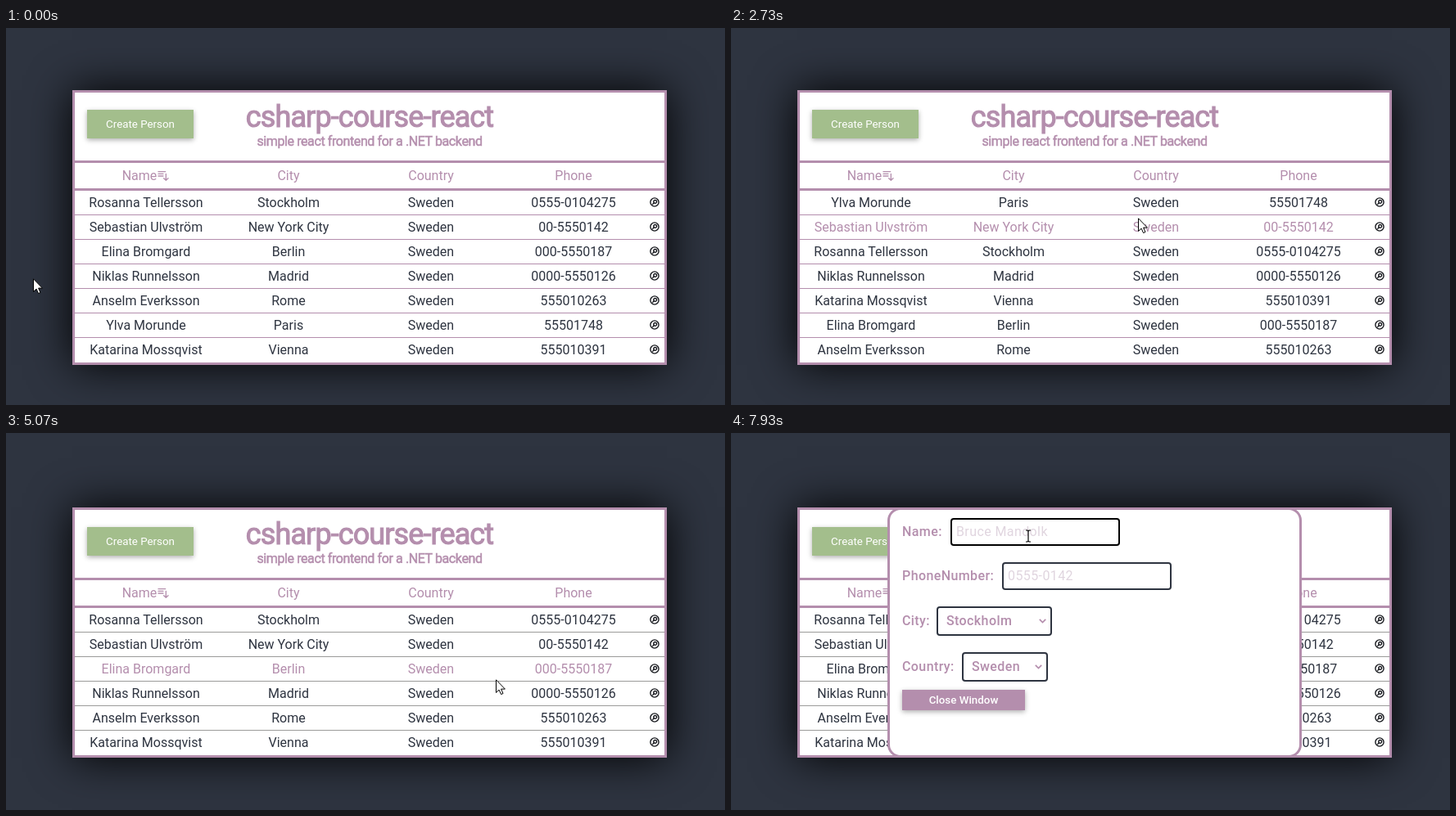
An HTML page that plays this animation: 878x461 px, repeating every 8 s.

```html
<!DOCTYPE html>
<html lang="en">
<head>
<meta charset="utf-8">
<title>csharp-course-react</title>
<style>
  html, body { margin: 0; width: 100%; height: 100%; overflow: hidden; background: #2e3440; }
  #stage { position: relative; width: 878px; height: 461px; overflow: hidden; font: 16px Roboto, sans-serif; color: #2e3440; }
  #stage div, #stage svg { position: absolute; box-sizing: border-box; white-space: pre; }
  .table { background: #fff; border: 3px solid #b48ead; box-shadow: 0 0 50px #000; }
  .modal { background: #fff; border: 3px solid #b48ead; border-radius: 16px; }
  .center { text-align: center; }
  .purple { color: #b48ead; }
  .rule { background: #b48ead; }
  .title, .subtitle { letter-spacing: -.025em; color: #b48ead; text-align: center; -webkit-text-stroke: .5px #b48ead; }
  .title { font-size: 36px; -webkit-text-stroke-width: 1.1px; }
  .heading { font-size: 32px; color: #b48ead; text-align: center; }
  .button { color: #fff; font-size: 13.333px; text-align: center; box-shadow: 0 2px 6px rgba(0, 0, 0, .32); }
  .medium { font-weight: 500; }
  .line { color: #000; }
  .label { color: #b48ead; font-weight: 500; letter-spacing: .025em; }
  .field { border: 2px solid #2e3440; border-radius: 4px; padding-left: 5px; letter-spacing: .025em; color: #e0d5df; background: #fff; }
  .select { padding-left: 10px; color: #b48ead; font-weight: 500; }
  .focus { border-color: #000; }
</style>
</head>
<body>
<div id="stage"></div>
<script>
const LOOP = 8000, FPS = 15;
const PURPLE = '#b48ead', GREEN = '#a3be8c', RED = '#bf616a', GRAY = '#c0c5ce';
const stage = document.getElementById('stage');

const people = [
  ['Rosanna Tellersson', 'Stockholm', '0555-0104275'],
  ['Sebastian Ulvström', 'New York City', '00-5550142'],
  ['Elina Bromgard', 'Berlin', '000-5550187'],
  ['Niklas Runnelsson', 'Madrid', '0000-5550126'],
  ['Anselm Everksson', 'Rome', '555010263'],
  ['Ylva Morunde', 'Paris', '55501748'],
  ['Katarina Mossqvist', 'Vienna', '555010391'],
].map(([name, city, phone], i) => ({ id: i + 1, name, city, country: 'Sweden', phone }));
const ascending = [...people].sort((a, b) => a.name < b.name ? -1 : 1);
const descending = [...ascending].reverse();
const selected = people[5];
const remaining = people.filter(p => p !== selected);

const when = {
  sortUp: 1860, sortDown: 2330, openCard: 3395, removed: 5060, openForm: 6525, focus: 6930,
};

// Pointer path: time, x, y
const path = [
  [600, 33, 306], [800, 72, 290], [933, 125, 266], [1067, 190, 233], [1200, 244, 201],
  [1333, 213, 188], [1467, 187, 183], [1533, 187, 182], [2533, 187, 182],
  [2600, 250, 196], [2733, 497, 232], [2867, 690, 240], [3000, 795, 232], [3067, 815, 224],
  [3200, 800, 215], [3333, 791, 212], [3467, 791, 212],
  [3600, 760, 232], [3667, 705, 250], [3800, 580, 292], [3933, 480, 313], [4133, 435, 309],
  [4467, 435, 309], [4600, 530, 304], [4733, 598, 301], [5267, 598, 301], [5333, 596, 301],
  [5467, 596, 301], [5600, 550, 288], [5800, 420, 245], [6000, 285, 190], [6133, 215, 157],
  [6333, 175, 145], [6533, 175, 145], [6667, 235, 139], [6800, 325, 129], [6933, 363, 126],
];

function pointerAt(t) {
  const next = path.findIndex(k => k[0] > t);
  if (next < 0) return path[path.length - 1].slice(1);
  if (next === 0) return path[0].slice(1);
  const [t0, x0, y0] = path[next - 1], [t1, x1, y1] = path[next];
  const u = (t - t0) / (t1 - t0);
  return [Math.round(x0 + (x1 - x0) * u), Math.round(y0 + (y1 - y0) * u)];
}

const inside = ([px, py], x, y, w, h) => px >= x && px < x + w && py >= y && py < y + h;

function box(cls, x, y, w, h, text = '', style = '') {
  return `<div class="${cls}" style="left:${x}px;top:${y}px;width:${w}px;height:${h}px;line-height:${h}px;${style}">${text}</div>`;
}

function icon(x, y, w, h, view, content) {
  return `<svg style="left:${x}px;top:${y}px" width="${w}" height="${h}" viewBox="${view}" fill="none" overflow="visible">${content}</svg>`;
}

function button(pointer, x, y, w, h, text, color, cls = '') {
  const fill = inside(pointer, x, y, w, h) ? GRAY : color;
  return box('button ' + cls, x, y, w, h, text, `background:${fill}`);
}

function sortIcon(x, y, up) {
  const d = up ? 'M3 4h13M3 8h9m-9 4h6m4 0l4-4m0 0l4 4m-4-4v12' : 'M3 4h13M3 8h9m-9 4h9m5-4v12m0 0l-4-4m4 4l4-4';
  return icon(x, y, 16, 16, '0 0 24 24', `<path d="${d}" stroke="${PURPLE}" stroke-width="2" stroke-linecap="round" stroke-linejoin="round"/>`);
}

function detailIcon(x, y) {
  return icon(x - 6, y - 6, 12, 12, '-6 -6 12 12',
    '<g stroke="#15171c" stroke-width="1.4"><circle r="5.1"/><circle cx=".7" cy="-.6" r="1.9"/><path d="M-.7 .8L-2.6 2.7"/></g>');
}

function table(t, pointer, modalOpen) {
  const rows = t < when.sortUp ? people : t < when.sortDown ? ascending : t < when.removed ? descending : remaining;
  const height = 126 + rows.length * 30, top = 244 - height / 2;
  const ruleColor = t < when.removed ? PURPLE : '#9b9b9a';
  const column = i => 84 + 174 * i;
  const covered = modalOpen && inside(pointer, 191, 91, 506, 306);

  let html = box('table', 81, top, 726, height)
    + button(pointer, 99, top + 24, 130, 35, 'Create Person', GREEN)
    + box('title', 264, top + 13, 360, 40, 'csharp-course-react')
    + box('subtitle', 264, top + 51, 360, 24, 'simple react frontend for a .NET backend')
    + box('rule', 84, top + 86, 720, 3) + box('rule', 84, top + 120, 720, 3);
  ['Name', 'City', 'Country', 'Phone'].forEach((text, i) => {
    html += box('center purple', column(i) - (i ? 0 : 8), top + 89, 174, 31, text);
  });
  html += sortIcon(184, top + 97, t >= when.sortUp && t < when.sortDown);

  rows.forEach((p, i) => {
    const y = top + 123 + 30 * i;
    const hover = !covered && inside(pointer, 84, y, 720, 30);
    [p.name, p.city, p.country, p.phone].forEach((text, c) => {
      html += box(hover ? 'center purple' : 'center', column(c), y, 174, 29, text);
    });
    html += detailIcon(791.5, y + 14);
    if (i < rows.length - 1) html += box('', 84, y + 29, 720, 1, '', `background:${ruleColor}`);
  });
  return html;
}

const frame = () => box('modal', 191, 91, 506, 306);

function card(pointer) {
  const { id, name, city, country, phone } = selected;
  const lines = [`ID: ${id}`, `NAME: ${name}`, `CITY: ${city}`, `COUNTRY: ${country}`, `PHONE: ${phone}`];
  return frame()
    + box('heading', 194, 94, 500, 58, 'IDENTIFICATION CARD')
    + box('rule', 194, 152, 500, 3)
    + box('', 209, 170, 150, 150, '', `background:${GRAY}`)
    + icon(209, 170, 150, 150, '0 0 150 150',
      '<g stroke="#fff" stroke-width="11" stroke-linejoin="round"><circle cx="75" cy="44" r="26.5"/>'
      + '<path d="M30.500 132V127C30.500 103 50 86.500 75 86.500S119.500 103 119.500 127V132Z"/></g>')
    + lines.map((text, i) => box('line', 374, 170 + 19 * i, 300, 19, text)).join('')
    + button(pointer, 374, 295, 150, 25, 'Close Window', PURPLE, 'medium')
    + button(pointer, 529, 295, 150, 25, 'Delete Person', RED, 'medium');
}

function select(x, y, w, text) {
  return box('field select', x, y, w, 36, text, 'line-height:32px')
    + icon(x + w - 16, y + 15, 9, 6, '0 0 9 6', `<path d="M.8 .8L4.500 4.500L8.200 .8" stroke="${PURPLE}" stroke-width="1.7"/>`);
}

function form(t, pointer) {
  const focused = t >= when.focus;
  const caret = focused && Math.floor((t - when.focus) / 200) % 2 === 0;
  const label = (y, text) => box('label', 209, y - 10, 130, 20, text);
  const input = (x, y, text, cls = '') => box('field ' + cls, x, y, 207, 34, text, 'line-height:30px');
  return frame()
    + label(121, 'Name:') + input(268, 104, 'Bruce Mandolk', focused ? 'focus' : '')
    + (caret ? box('rule', 275, 111, 1, 20) : '')
    + label(175, 'PhoneNumber:') + input(331, 158, '0555-0142')
    + label(230, 'City:') + select(251, 212, 141, 'Stockholm')
    + label(286, 'Country:') + select(282, 268, 105, 'Sweden')
    + button(pointer, 209, 314, 150, 25, 'Close Window', PURPLE, 'medium');
}

function cursor([x, y], typing) {
  return typing
    ? icon(x - 4, y - 8, 8, 16, '-4 -8 8 16', '<path d="M-3 -7H-1L0 -6L1 -7H3M0 -6V6M-3 7H-1L0 6L1 7H3" stroke="#000" stroke-width="1.2"/>')
    : icon(x, y, 12, 19, '0 0 12 19', '<path d="M.5 .8V16.500L4.100 13.100L6.600 18.600L9 17.500L6.600 12.100H11.400Z" fill="#fff" stroke="#000"/>');
}

function render(t) {
  const pointer = pointerAt(t);
  const cardOpen = t >= when.openCard && t < when.removed;
  const formOpen = t >= when.openForm;
  stage.innerHTML = table(t, pointer, cardOpen || formOpen)
    + (cardOpen ? card(pointer) : '')
    + (formOpen ? form(t, pointer) : '')
    + cursor(pointer, formOpen && inside(pointer, 268, 104, 207, 34));
}

let start = null, lastStep = -1;
function tick(now) {
  start ??= now;
  const step = Math.floor(((now - start) % LOOP + 4) * FPS / 1000);
  if (step !== lastStep) render(step * 1000 / FPS % LOOP);
  lastStep = step;
  requestAnimationFrame(tick);
}
render(0);
requestAnimationFrame(tick);
</script>
</body>
</html>
```
